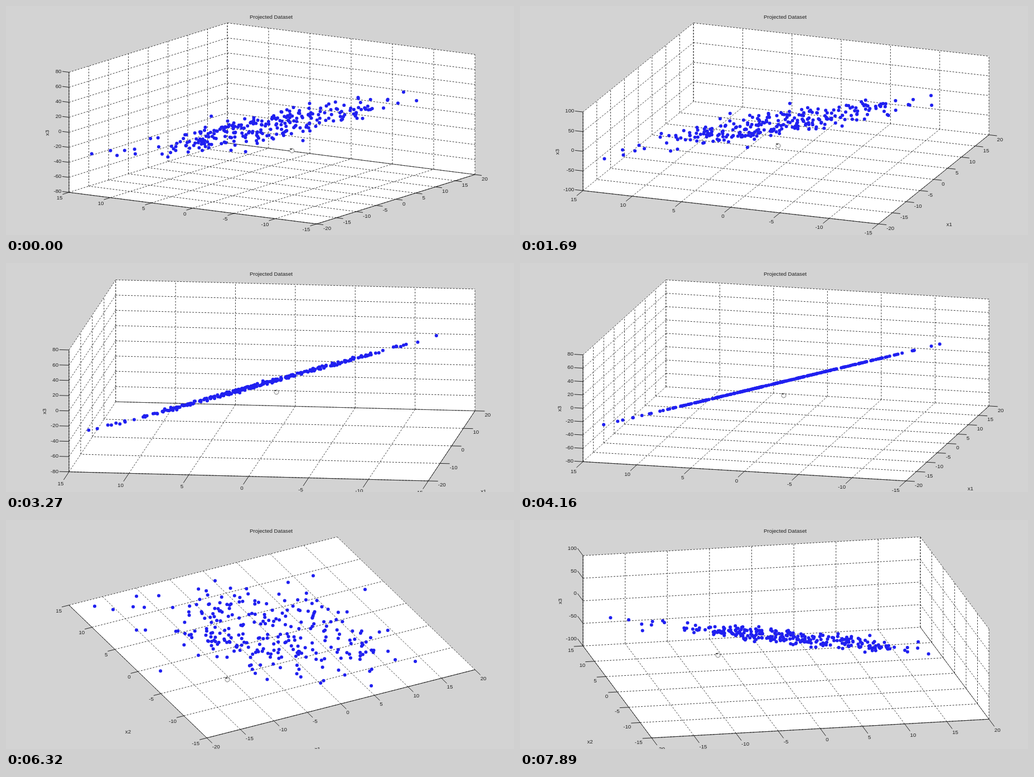
These frames come from a looping animation (911 by 413 pixels, 8 s). An HTML page with a canvas:

```html
<!DOCTYPE html>
<html lang="en">
<head>
<meta charset="utf-8">
<title>Projected Dataset</title>
<style>
html, body { margin: 0; width: 100%; height: 100%; overflow: hidden; background: #d3d3d3; }
canvas { display: block; }
</style>
</head>
<body>
<canvas id="stage" width="911" height="413"></canvas>
<script>
const ctx = document.getElementById('stage').getContext('2d');
const LOOP = 8000, STEP = 106;
const LEFT = 113, RIGHT = 841, TOP = 30.5, BOTTOM = 393;
const INK = '#222', GRID = '#3a3a3a';

// Camera angles in degrees and pointer position
const KEYS = [
  { t: 360, az: 57.4, el: 26, x: 513, y: 260 },
  { t: 1690, az: 69.5, el: 50.4, x: 463, y: 251 },
  { t: 3270, az: 82.6, el: 30.1, x: 485, y: 232 },
  { t: 4160, az: 75.6, el: 35.9, x: 473, y: 238 },
  { t: 5170, az: 66.6, el: 40.2, x: 452, y: 241 },
  { t: 6320, az: 27.2, el: 90, x: 397, y: 287 },
  { t: 7890, az: 11.5, el: 46.1, x: 355, y: 243 }
];

const slope = (k, i) => (KEYS[i + 1][k] - KEYS[i][k]) / (KEYS[i + 1].t - KEYS[i].t);

function tangent(k, i) {
  if (i === 0 || i === KEYS.length - 1) return 0;
  const a = slope(k, i - 1), b = slope(k, i);
  return a * b <= 0 ? 0 : 2 * a * b / (a + b);
}

// Monotone cubic between keys, redrawn in even steps
function pose(t) {
  const last = KEYS.length - 1;
  if (t < KEYS[0].t) return KEYS[0];
  if (t >= KEYS[last].t) return KEYS[last];
  let i = 0;
  while (t >= KEYS[i + 1].t) i++;
  const a = KEYS[i], b = KEYS[i + 1], h = b.t - a.t;
  const n = Math.round(h / STEP);
  const first = i === 0 ? 1 : 0;
  const s = Math.min(1, (Math.floor((t - a.t) / h * n + 1e-6) + first) / (n + first));
  const s2 = s * s, s3 = s2 * s;
  const at = k => a[k] + (b[k] - a[k]) * (3 * s2 - 2 * s3)
    + h * (tangent(k, i) * (s3 - 2 * s2 + s) + tangent(k, i + 1) * (s3 - s2));
  return { az: at('az'), el: at('el'), x: at('x'), y: at('y') };
}

function rng(seed) {
  return () => {
    seed = (seed + 0x6D2B79F5) | 0;
    let r = Math.imul(seed ^ seed >>> 15, 1 | seed);
    r = r + Math.imul(r ^ r >>> 7, 61 | r) ^ r;
    return ((r ^ r >>> 14) >>> 0) / 4294967296;
  };
}

// Top-view position to a point on the data plane
function lift(x, y) {
  const dx = x - 113, dy = y - 153, det = 145821;
  const u = (240 * dx - 247 * dy) / det;
  const q = (481 * dy + 123 * dx) / det;
  return { u, q, z: -2.07 * (40 * u - 20) - 4.83 * (15 - 30 * q) - 0.9 };
}

// A few outliers around an even, slanted cloud
const points = [
  [159, 155], [192, 161], [234, 137], [228, 156], [248, 157], [274, 136],
  [234, 198], [250, 198], [277, 272], [375, 109], [506, 112], [551, 100],
  [644, 125], [698, 252], [734, 255], [655, 299]
].map(p => lift(...p));

const rand = rng(17);
while (points.length < 270) {
  const s = 0.75 * rand() + 0.25 * rand();
  const half = 48 + 45 * Math.sin(Math.PI * s);
  const spread = 1.4 * rand() + 0.6 * rand() - 1;
  const p = lift(282 + 412 * s, 172 + 62 * s + half * spread);
  if (Math.abs(p.z) < 66) points.push(p);
}

function line(a, b, dashed) {
  ctx.setLineDash(dashed ? [3, 2.5] : []);
  ctx.beginPath();
  ctx.moveTo(...a);
  ctx.lineTo(...b);
  ctx.stroke();
}

function text(str, x, y, align = 'center') {
  ctx.textAlign = align;
  ctx.fillText(str, x, y);
}

function range(lim, step) {
  const out = [];
  for (let v = -lim; v <= lim; v += step) out.push(v);
  return out;
}

function pointer(x, y) {
  ctx.strokeStyle = '#777';
  ctx.fillStyle = '#f4f4f4';
  ctx.setLineDash([]);
  ctx.beginPath();
  ctx.arc(x, y + 1, 4, -2.2, 3.4);
  ctx.fill();
  ctx.stroke();
  ctx.fillStyle = '#444';
  ctx.fillRect(x - 4, y - 3, 4, 2);
}

function draw({ az, el, x: px, y: py }) {
  const rad = Math.PI / 180;
  const s = Math.sin(az * rad), c = Math.cos(az * rad);
  const se = Math.sin(el * rad), ce = Math.cos(el * rad);

  // The projected box always fills the same rectangle
  const kx = (RIGHT - LEFT) / (s + c);
  const ky = (BOTTOM - TOP) / (se * (s + c) + ce);
  const ux = kx * c, uy = ky * se * s;
  const qx = kx * s, qy = ky * se * c;
  const zLen = ky * ce;
  const project = (u, q, w) =>
    [LEFT + ux * u + qx * q, BOTTOM - qy + qy * q - uy * u - zLen * w];

  const uLen = Math.hypot(ux, uy), qLen = Math.hypot(qx, qy);
  const tick = 0.027 * Math.max(uLen, qLen, zLen);
  const du = [-ux / uLen * tick, uy / uLen * tick];
  const dq = [qx / qLen * tick, qy / qLen * tick];
  const flat = el > 88;
  const zLim = zLen < 167 ? 100 : 80;
  const zTicks = range(zLim, zLen < 70 ? 100 : zLen < 167 ? 50 : 20);
  const xTicks = range(20, uLen < 167 ? 10 : 5);
  const yTicks = range(15, 5);
  const toU = v => (v + 20) / 40;
  const toQ = v => (15 - v) / 30;
  const toW = v => (v + zLim) / (2 * zLim);

  ctx.fillStyle = '#d3d3d3';
  ctx.fillRect(0, 0, 911, 413);

  ctx.fillStyle = '#fff';
  ctx.beginPath();
  [[0, 0, 0], [0, 0, 1], [1, 0, 1], [1, 1, 1], [1, 1, 0], [0, 1, 0]]
    .forEach(p => ctx.lineTo(...project(...p)));
  ctx.fill();

  // Grid on the floor and both walls
  ctx.lineWidth = 1;
  ctx.strokeStyle = GRID;
  for (const u of xTicks.map(toU)) {
    line(project(u, 1, 0), project(u, 0, 0), true);
    if (!flat) line(project(u, 0, 0), project(u, 0, 1), true);
  }
  for (const q of yTicks.map(toQ)) {
    line(project(0, q, 0), project(1, q, 0), true);
    if (!flat) line(project(1, q, 0), project(1, q, 1), true);
  }
  if (!flat) for (const w of zTicks.map(toW).filter(w => w > 0)) {
    line(project(0, 0, w), project(1, 0, w), true);
    line(project(1, 0, w), project(1, 1, w), true);
  }
  if (el < 33 || az < 20) line(project(1, 0, 0), project(1, 1, 0));

  // Axes, ticks and labels
  ctx.font = '9.7px "Liberation Sans", Arial, sans-serif';
  ctx.textBaseline = 'middle';
  ctx.fillStyle = INK;
  ctx.strokeStyle = INK;
  line(project(0, 0, 0), project(0, 1, 0));
  line(project(0, 1, 0), project(1, 1, 0));

  const mark = (p, d) => {
    const end = [p[0] + d[0], p[1] + d[1]];
    line(p, end);
    return end;
  };
  for (const v of xTicks) {
    const e = mark(project(toU(v), 1, 0), dq);
    text(v, e[0], e[1] + 7, 'left');
  }
  for (const v of yTicks) {
    const e = mark(project(0, toQ(v), 0), du);
    text(v, e[0], e[1] + 7, 'right');
  }
  if (!flat) {
    line(project(0, 0, 0), project(0, 0, 1));
    for (const v of zTicks) {
      const e = mark(project(0, 0, toW(v)), [-dq[0], -dq[1]]);
      text(v, e[0] - 1.5, e[1], 'right');
    }
    ctx.save();
    ctx.translate(LEFT - dq[0] - (zLim > 80 ? 31 : 26.5), project(0, 0, 0.5)[1] + 1);
    ctx.rotate(-Math.PI / 2);
    text('x3', 0, 0);
    ctx.restore();
  }

  const mx = project(0.5, 1, 0), my = project(0, 0.5, 0);
  text('x1', mx[0] - 42 + 0.537 * Math.max(0, az - 27.2) ** 1.3, mx[1] + 82);
  text('x2', my[0] + 2 * (az - 36), my[1] + 76 + 1.2 * az);
  text('Projected Dataset', 475.5, 20);

  pointer(px, py);

  ctx.fillStyle = '#2020f0';
  for (const p of points) {
    ctx.beginPath();
    ctx.arc(...project(p.u, p.q, toW(p.z)), 3, 0, 2 * Math.PI);
    ctx.fill();
  }
}

const start = performance.now();
function frame() {
  draw(pose((performance.now() - start) % LOOP));
  requestAnimationFrame(frame);
}
frame();
</script>
</body>
</html>
```
